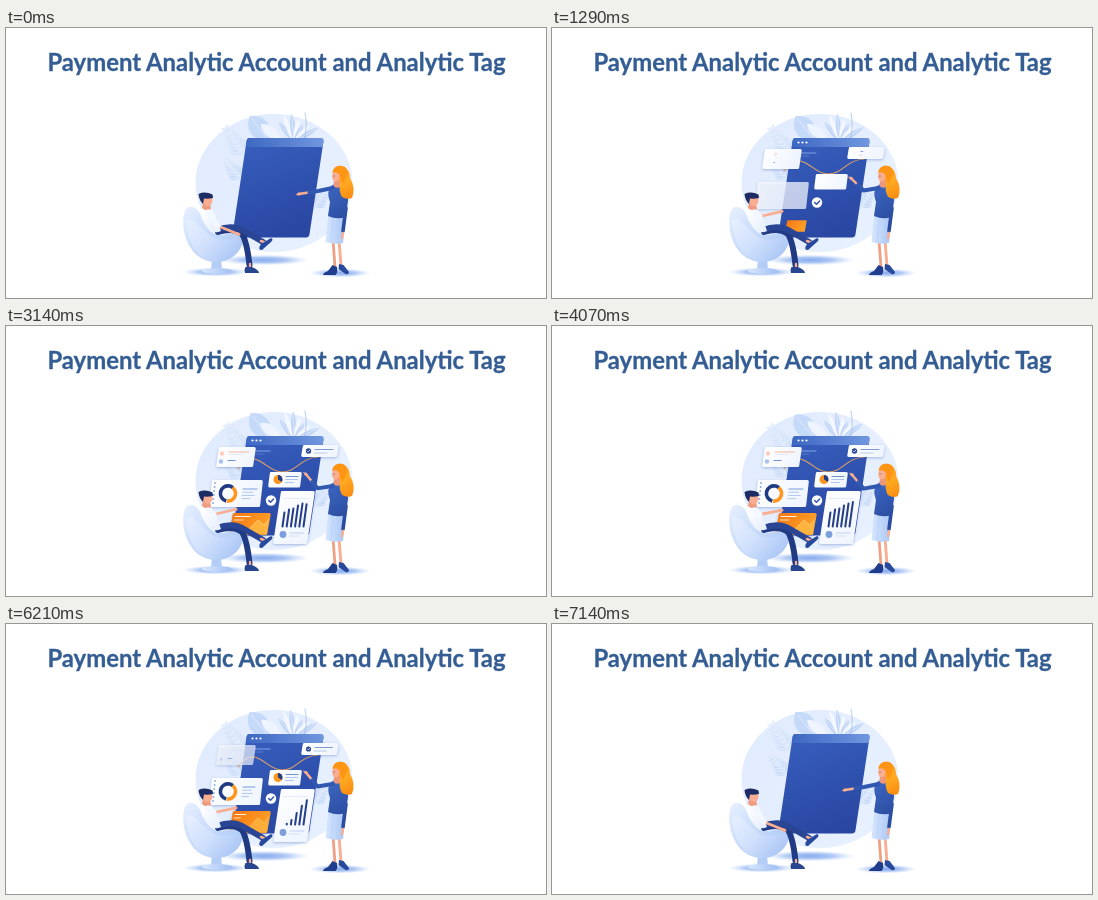
Animation of 540 by 270 pixels, one loop 7.21 s. Source, as an HTML page with a canvas:

```html
<!DOCTYPE html>
<html lang="en">
<head>
<meta charset="utf-8">
<title>Payment Analytic Account and Analytic Tag</title>
<style>
html, body { margin: 0; width: 100%; height: 100%; overflow: hidden; background: #fff; }
canvas { position: absolute; left: 0; top: 0; width: 540px; height: 270px; }
h1 { position: absolute; left: 0; top: 19px; width: 541px; margin: 0; text-align: center;
  white-space: nowrap; font: 700 23.87px/30px Lato, sans-serif; color: #345d94;
  -webkit-text-stroke: 0.3px #345d94; }
</style>
</head>
<body>
<canvas id="stage"></canvas>
<h1>Payment Analytic Account and Analytic Tag</h1>
<script>
const LOOP = 7210, STEPS = 101;
const canvas = document.getElementById('stage');
const c = canvas.getContext('2d');
const dpr = window.devicePixelRatio || 1;
canvas.width = 540 * dpr;
canvas.height = 270 * dpr;

const NAVY = '#1d2c63', BLUE = '#3154b0', ORANGE = '#ff971f', SKIN = '#f9ad91';
let now = 0;

const mix = (a, b, k) => a + (b - a) * k;
function ease(a, b) {
  const k = Math.min(1, Math.max(0, (now - a) / (b - a)));
  return k * k * (3 - 2 * k);
}
// Rises over [a, b] and falls over [d, e].
const show = (a, b, d, e) => ease(a, b) * (1 - ease(d, e));
const wave = (cycles, phase = 0) => Math.sin(now / LOOP * Math.PI * 2 * cycles + phase);

function grad(x0, y0, x1, y1, ...colors) {
  const g = c.createLinearGradient(x0, y0, x1, y1);
  colors.forEach((s, i) => g.addColorStop(i / (colors.length - 1), s));
  return g;
}
function fill(d, color) {
  c.fillStyle = color;
  c.fill(new Path2D(d));
}
function stroke(d, color, width) {
  c.strokeStyle = color;
  c.lineWidth = width;
  c.lineCap = c.lineJoin = 'round';
  c.stroke(new Path2D(d));
}
function oval(x, y, rx, ry, color, turn = 0) {
  c.fillStyle = color;
  c.beginPath();
  c.ellipse(x, y, Math.max(0, rx), Math.max(0, ry), turn, 0, 7);
  c.fill();
}
const dot = (x, y, r, color) => oval(x, y, r, r, color);
function line(x, y, len, color = '#a9bfe6', width = 1) {
  if (len > 0.3) stroke(`M${x} ${y}h${len}`, color, width);
}
// Sheet with rounded corners whose lower edge is shifted left by the lean.
function sheet(x, y, w, h, lean, r, color) {
  const p = [[x, y], [x + w, y], [x + w - lean, y + h], [x - lean, y + h]];
  c.beginPath();
  c.moveTo(x + w / 2, y);
  for (let i = 1; i <= 4; i++) c.arcTo(...p[i % 4], ...p[(i + 1) % 4], r);
  c.closePath();
  c.fillStyle = color;
  c.fill();
}
function part(x, y, scale, alpha, turn, draw) {
  if (scale <= 0.01 || alpha <= 0.01) return;
  c.save();
  c.globalAlpha *= alpha;
  c.translate(x, y);
  c.rotate(turn);
  c.scale(scale, scale);
  c.translate(-x, -y);
  draw();
  c.restore();
}
const paper = (x, y, w, h) => grad(x, y, x + w, y + h, '#ffffff', '#edf3ff');
function card(x, y, w, h, lean, scale, alpha, color, content) {
  part(x + w / 2 - lean / 2, y + h / 2, scale, alpha, 0, () => {
    c.save();
    c.shadowColor = 'rgba(40,75,160,.35)';
    c.shadowBlur = 3 * dpr;
    c.shadowOffsetY = dpr;
    sheet(x, y, w, h, lean, 1.5, color);
    c.restore();
    content();
  });
}
function check(x, y, r, disc, mark) {
  dot(x, y, r, disc);
  stroke(`M${x - r * .45} ${y}l${r * .35} ${r * .35}l${r * .6} ${-r * .65}`, mark, r * .28);
}
function ring(x, y, r, width, from, to, color) {
  c.strokeStyle = color;
  c.lineWidth = width;
  c.lineCap = 'butt';
  c.beginPath();
  c.arc(x, y, r, from, to);
  c.stroke();
}

function leaf(x, y, angle, len, width, color) {
  c.save();
  c.translate(x, y);
  c.rotate(angle);
  fill(`M0 0C${-width} ${-len * .35} ${-width} ${-len * .75} 0 ${-len}C${width} ${-len * .75} ${width} ${-len * .35} 0 0`, color);
  stroke(`M0 0V${-len * .9}`, 'rgba(255,255,255,.7)', 0.6);
  c.restore();
}
function frond(x, y, angle, len, spread, color) {
  c.save();
  c.translate(x, y);
  c.rotate(angle);
  stroke(`M0 0V${-len}`, color, 0.8);
  for (let i = 1; i <= 7; i++) {
    const size = spread * (1.1 - i * .1);
    for (const side of [-1, 1]) leaf(0, -len * i / 7.5, side * .85, size, size * .2, color);
  }
  c.restore();
}

function backdrop() {
  oval(268, 155, 78.5, 69, grad(195, 95, 335, 215, '#e0ebfe', '#e4eefe', '#e8f1ff'));
  const sway = 0.045 * wave(3), pale = '#c9dbf9';
  frond(241, 130, -.62 + sway, 38, 14, '#d0e0fb');
  frond(237, 153, -.72 - sway, 28, 12, pale);
  leaf(264, 114, -.66 + sway, 33, 13, '#c5d9f9');
  leaf(276, 113, -.9 - sway, 27, 7, '#edf4ff');
  for (let i = 0; i < 7; i++)
    leaf(288, 114, -.65 + i * .28 + sway * (1 + i * .2), 25 + 5 * Math.sin(i * 1.15), 3.2, i % 2 ? '#f1f6ff' : '#bfd4f6');
  stroke('M298 112Q302 99 299 85', '#9db9e8', .7);
  frond(307, 182, .6 + sway, 26, 11, '#c3d7f8');

  const glow = c.createRadialGradient(0, 0, 0, 0, 0, 1);
  glow.addColorStop(0, '#86aaed');
  glow.addColorStop(.5, 'rgba(155,187,241,.8)');
  glow.addColorStop(1, 'rgba(200,218,250,0)');
  for (const [x, y, w, h] of [[258, 232, 46, 5.5], [210, 244, 34, 4.5], [334, 245, 31, 4.5]]) {
    c.save();
    c.translate(x, y);
    c.scale(w, h);
    dot(0, 0, 1, glow);
    c.restore();
  }
}

function board() {
  sheet(241, 110, 77, 99.5, 15, 3.5, grad(250, 115, 285, 210, '#375dbc', '#2f51ae', '#2946a1'));
  fill('M243 110H315Q318 110 317.6 113L316.6 119H239.7L240.6 113Q241 110 243 110', grad(240, 0, 318, 0, '#3d67c2', '#7197df'));
  const ui = show(150, 500, 6700, 7080);
  for (const x of [246.5, 250.5, 254.5]) dot(x, 114.5, 1.1 * ui, '#fff');
  line(249, 125, 15 * ui, '#7fa3e7', 1);
  line(249, 128, 8 * ui, '#5d84d0', .8);
  const k = show(350, 1150, 6350, 7000);
  if (k > .01) {
    c.save();
    c.setLineDash([100 * k, 200]);
    stroke('M232 143C237 136 242 132 248 133C259 135 264 146 276 146C291 146 294 132 312 131', '#e4a35f', 1.1);
    c.restore();
  }
}

function statusCard() {
  const k = show(250, 1350, 5950, 6650);
  card(213, 121, 37, 20, 3, 1, k, paper(213, 121, 37, 20), () => {
    const a = show(1150, 1950, 5700, 6250);
    dot(216, 127.5, 2.2 * a, '#ffcdb9');
    line(223, 126, 20 * a, '#f4b89d');
    line(223, 128.5, 13 * a, '#dce6f8', .8);
    const b = show(1150, 2050, 5950, 6500);
    dot(215, 135.5, 2.2 * b, '#a9c1ee');
    line(222, 134.5, 7 * b, '#6c91d9', 1.2);
  });
}
function checkCard() {
  const k = show(500, 1250, 6350, 7000);
  card(297, 119, 36, 12, 2, 1, k, paper(297, 119, 36, 12), () => {
    const t = show(1150, 1850, 6150, 6700);
    check(302.5, 125, 2.7 * t, '#29458f', '#fff');
    line(309, 123.5, 18 * t, '#7d9bd6', 1.1);
    line(308, 127, 13 * t, '#b9caea');
  });
}
function donutCard() {
  const fade = show(650, 1600, 6350, 7000);
  card(206, 154, 51, 27, 3, 1, fade, paper(206, 154, 51, 27), () => {
    ring(222, 167.5, 7.5, .6, 0, 7, '#e2eaf8');
    const k = show(1600, 3200, 6200, 6850);
    if (k > .01) {
      const r = mix(3.8, 7.6, k), w = mix(2, 3.6, k), sweep = Math.min(1, k * 1.6);
      ring(222, 167.5, r, w, 1.8, 1.8 + 3.6 * sweep, '#203a82');
      ring(222, 167.5, r, w, -.9, -.9 + 2.6 * sweep, ORANGE);
    }
    const text = show(2350, 3100, 6050, 6700);
    [14, 10, 12, 8].forEach((n, i) => line(237 - i * .4, 163 + i * 3.2, n * text, i ? '#b0c7ee' : '#789ddd', 1));
    const marks = show(1600, 2350, 6200, 6700);
    for (let i = 0; i < 6; i++) dot(209 - i * .4, 157 + i * 4, .9 * marks, '#87a8e4');
  });
}
function pieCard() {
  const fade = show(450, 1050, 6400, 7020);
  card(264, 146, 32, 15.5, 2, 1, fade, paper(264, 146, 32, 15.5), () => {
    const k = show(1300, 2050, 6200, 6750);
    dot(272, 153.5, 4.5 * k, ORANGE);
    c.fillStyle = '#233d87';
    c.beginPath();
    c.moveTo(272, 153.5);
    c.arc(272, 153.5, 4.5 * k, -1.6, .6 * k);
    c.fill();
    [12, 12, 8].forEach((n, i) => line(280 - i * .3, 150.5 + i * 3, n * k, i ? '#b0c5ea' : '#7393d0', 1));
  });
}
function orangeCard() {
  const k = show(750, 1800, 6350, 6950);
  card(227, 187, 38, 22, 4, k, Math.min(1, k * 3), grad(228, 187, 260, 209, '#f67913', '#ffa329'), () => {
    const g = show(1600, 2300, 6000, 6600);
    line(229, 190.5, 15 * g, '#fff3df', 1.2);
    line(228, 194, 9 * g, '#ffe0b5', 1);
    c.globalAlpha *= g;
    fill('M224 207L234 201L242 204L252 194L258 199L263 193L261 208Z', 'rgba(255,190,73,.75)');
    stroke('M225 206L234 201L242 204L252 194L258 199L263 193', '#ffd084', .7);
  });
}
function barCard() {
  const k = show(1200, 2100, 6400, 6980);
  card(275, 165, 34, 53, 8, k, Math.min(1, k * 3), paper(275, 165, 34, 53), () => {
    const tops = [187, 184, 183, 180, 178, 176.5];
    tops.forEach((top, i) => {
      const rise = ease(1700 + i * 150, 2550 + i * 150);
      const drop = ease(5300 + i * 170, 6150 + i * 170);
      const h = (201 - top) * rise * (1 - drop);
      const x = 276.5 + i * 4.2;
      if (h > .3) stroke(`M${x} 200.5L${x + h * .14} ${200.5 - h}`, '#253f89', 2);
    });
    const text = show(1800, 2300, 6200, 6700);
    stroke('M277 172.5H302', `rgba(218,229,249,${text})`, .7);
    dot(277, 208.5, 3.4 * text, '#7d9edc');
    line(284, 207, 14 * text, '#c0d1f1');
    line(283.5, 210, 10 * text, '#d5e1f7');
  });
}

function chair() {
  fill('M206 231H215L216 242H205Z', '#b4cdf7');
  oval(211, 243, 15, 3, grad(196, 0, 226, 0, '#d9e7ff', '#a2c0f2'));
  fill('M186 179C178 177 176 190 178 203C181 220 193 234 210 234C228 234 239 219 236 209C234 203 225 205 218 207C207 208 201 201 197 192C194 184 191 180 186 179', grad(178, 180, 228, 230, '#e6effe', '#c9dcfb', '#a9c6f5'));
  fill('M180 192C190 187 196 206 211 211C220 214 230 208 236.5 210C237 222 226 234 210 234C194 234 181 217 180 192', grad(182, 195, 224, 233, '#e5eeff', '#d0e0fc', '#adc8f6'));
}
function man() {
  const k = show(450, 1250, 6350, 7000);
  chair();
  stroke('M212 204Q227 199 236 206Q241 214 243.5 237', '#213a84', 6);
  stroke('M211 202Q227 196 238 203L257 214', '#2a4594', 6);
  stroke('M255 213L260 215', SKIN, 2.5);
  stroke('M244 236V240', SKIN, 2.3);
  fill('M255 216L265 210Q268 211 265 214L256 222Q251 222 255 216', '#274a9e');
  fill('M239.5 239L246 239Q253 242 253 245H239Q238 241 239.5 239', '#27468f');

  fill('M194 183Q197 178 203 180Q209 184 212 194L215 203Q207 207 201 199Q195 192 194 183', grad(195, 182, 214, 203, '#ffffff', '#e6eefd'));
  fill('M197 175L204 175L205 181Q200 184 196 180Z', '#ee9b80');
  const bob = .25 * wave(4);
  oval(201.5, 172 + bob, 5, 6, SKIN, -.1);
  fill('M192.5 166Q199 163 206.5 166.5L207 170Q202 171 198 170.5L197 176Q193 172 192.5 166', NAVY);
  // The forearm rises from the lap to the hovering cards.
  const hx = mix(232, 229, k), hy = mix(206, 184 + .5 * wave(4), k);
  const ex = mix(212, 208, k), ey = mix(198, 188.5, k);
  stroke(`M${ex} ${ey}L${hx} ${hy}`, SKIN, 2.8);
  oval(hx, hy, 2.6, 1.6, SKIN, mix(.3, -.2, k));
  stroke(`M202 184L${ex} ${ey}`, '#f3f7ff', 5);
}

function woman() {
  const k = show(350, 1550, 6250, 7050);
  const sway = .35 * wave(4);
  stroke('M327 212L329 239', '#efa084', 2.8);
  stroke('M333 212L335 238', SKIN, 2.9);
  fill('M326.5 237L331 239Q332 245 329.5 247H317Q317 245 322 243Z', '#203d8d');
  fill('M333 236L337.5 237L343 244Q343 247 339.5 246L332.5 241Z', '#294a9c');
  fill('M322.5 184H340L337 215Q328 217 319.5 214Z', grad(319, 200, 340, 200, '#d8e7ff', '#a6c4f4'));
  stroke('M327 191L325 214M333 191L331 215', '#b7d0f7', .7);
  stroke('M340 180L337 203', '#2b4c9f', 3.6);
  stroke('M337 205L336 210', SKIN, 2.3);
  fill('M325 158Q330 154 337 158Q343 163 342 173L339.5 189Q331 192 322 188L324 174Q320 164 325 158', grad(322, 160, 342, 189, '#3c65c1', '#2b4da0'));
  fill('M328 151H334V159Q330 161 327.5 158Z', '#ed987a');
  part(335, 160, 1, 1, sway * .045, () => {
    fill('M331 141Q334 136 339 139Q344 143 344 150Q350 160 346 170Q341 172 336 169Q332.5 163 334 155Z', grad(329, 139, 347, 170, '#ff8e0d', '#ffaa22', '#f98a10'));
    oval(330, 148, 3.8, 5.7, SKIN, .1);
    fill('M326.3 145Q327 138 334 137.5Q340 138.5 341 146L337 156Q334 151 333.5 146.5Q330 143 326.3 145', '#ff9514');
    stroke('M327.3 148h1.4', '#7c5a63', .6);
  });
  const hx = mix(293, 300, k), hy = mix(166, 148.5 + sway, k);
  const ex = mix(312, 311.5, k), ey = mix(163, 162.5 + sway * .4, k);
  stroke(`M${ex} ${ey}L${hx} ${hy}`, SKIN, 2.4);
  stroke(`M326.5 160L${ex} ${ey}L${mix(ex, hx, .45)} ${mix(ey, hy, .45)}`, '#3158b1', 4);
  oval(hx, hy, 2.2, 1.5, SKIN, mix(-.2, .6, k));
  stroke(`M${hx} ${hy}l-2.4 ${mix(.6, -1.6, k)}`, SKIN, 1);
}

function frame() {
  now = Math.floor((performance.now() % LOOP) / LOOP * STEPS) * LOOP / STEPS;
  c.setTransform(dpr, 0, 0, dpr, 0, 0);
  c.clearRect(0, 0, 540, 270);
  backdrop();
  board();
  checkCard();
  statusCard();
  donutCard();
  orangeCard();
  pieCard();
  part(265, 174.5, show(500, 1000, 6450, 7000), 1, 0, () => check(265, 174.5, 5.2, '#fff', BLUE));
  barCard();
  man();
  woman();
  requestAnimationFrame(frame);
}
frame();
</script>
</body>
</html>
```
